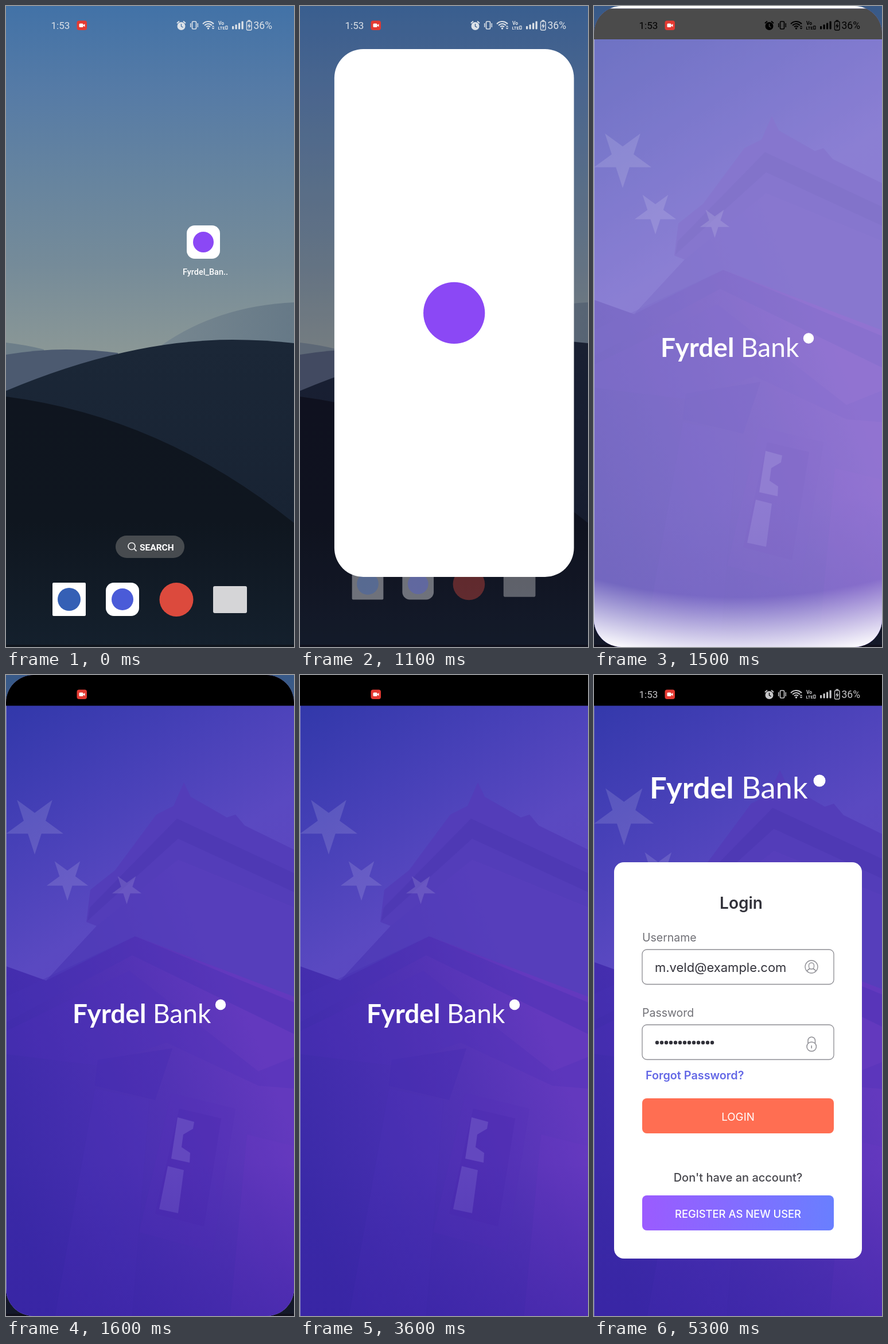
An HTML page with a canvas that plays this animation: 502 px wide and 1116 px high, repeating every 6.2 s.

```html
<!DOCTYPE html>
<html lang="en">
<head>
<meta charset="utf-8">
<title>Bank app launch</title>
<style>
  html, body { margin: 0; width: 100%; height: 100%; overflow: hidden; background: #000; }
  canvas { display: block; width: 502px; height: 1116px; }
</style>
</head>
<body>
<canvas id="stage" width="502" height="1116"></canvas>
<script>
const W = 502, H = 1116, LOOP = 6200, STEP = 100, BAR = 53.5;
const ctx = document.getElementById('stage').getContext('2d');
const clamp = v => Math.max(0, Math.min(1, v));
const lerp = (a, b, p) => a + (b - a) * p;

function gradient(x0, y0, x1, y1, ...colors) {
  const g = ctx.createLinearGradient(x0, y0, x1, y1);
  colors.forEach((c, i) => g.addColorStop(i / (colors.length - 1), c));
  return g;
}

function rect(x, y, w, h, fill) {
  ctx.fillStyle = fill;
  ctx.fillRect(x, y, w, h);
}

function box(x, y, w, h, r, fill, stroke, width = 1.3) {
  ctx.beginPath();
  ctx.roundRect(x, y, w, h, r);
  if (fill) { ctx.fillStyle = fill; ctx.fill(); }
  if (stroke) { ctx.strokeStyle = stroke; ctx.lineWidth = width; ctx.stroke(); }
}

function circle(x, y, r, fill) {
  ctx.beginPath();
  ctx.arc(x, y, r, 0, Math.PI * 2);
  ctx.fillStyle = fill;
  ctx.fill();
}

function shape(d, fill) {
  ctx.fillStyle = fill;
  ctx.fill(new Path2D(d), 'evenodd');
}

function line(d, color, width = 1.5) {
  ctx.strokeStyle = color;
  ctx.lineWidth = width;
  ctx.stroke(new Path2D(d));
}

function text(str, x, y, font, fill, align = 'left') {
  ctx.font = font + ', sans-serif';
  ctx.textAlign = align;
  ctx.fillStyle = fill;
  ctx.fillText(str, x, y);
}

function group(draw) {
  ctx.save();
  draw();
  ctx.restore();
}

// Five-pointed star with its tip downwards.
function star(x, y, r, fill) {
  ctx.beginPath();
  for (let i = 0; i < 10; i++) {
    const a = Math.PI / 2 + i * Math.PI / 5, d = i % 2 ? r * 0.382 : r;
    ctx.lineTo(x + d * Math.cos(a), y + d * Math.sin(a));
  }
  ctx.fillStyle = fill;
  ctx.fill();
}

function statusBar(ink) {
  text('1:53', 78.5, 40, '17px Roboto', ink);
  text('36%', 431.5, 40, '17.5px Roboto', ink);

  box(123.5, 25.5, 17.5, 16.5, 4, '#e33a32');
  box(127.5, 30.5, 7, 6.5, 1.5, '#fff');
  shape('M134 33.7L137.5 31V36.5Z', '#fff');

  // The clock hands are cut out of the dial.
  shape('M298.5 35A7 7 0 0 1 312.5 35A7 7 0 0 1 298.5 35ZM304.8 31H306.2V35L308.9 36.7L308.2 37.8L304.8 35.8Z', ink);
  line('M298 30L302 26.5M313 30L309 26.5', ink, 2);

  box(324.5, 27, 7, 13, 1.5, null, ink, 1.7);
  line('M321.7 30V37M334.3 30V37', ink, 1.5);

  ctx.strokeStyle = ink;
  ctx.lineWidth = 2.2;
  for (const r of [4.5, 8.5, 12.5]) {
    ctx.beginPath();
    ctx.arc(352.5, 39.5, r, -Math.PI * 0.77, -Math.PI * 0.23);
    ctx.stroke();
  }
  circle(352.5, 39, 1.7, ink);
  shape('M358.5 36.5L361 34L363.5 36.5ZM358.5 38L361 40.5L363.5 38Z', ink);

  text('Vo', 370, 33, 'bold 8.5px Roboto', ink);
  text('LTE', 369.5, 41, 'bold 7.5px Roboto', ink);
  box(382.8, 34.8, 3.2, 5.6, 0.5, null, ink, 1.2);

  for (let i = 0; i < 4; i++) box(394 + i * 5.5, 35 - i * 2.8, 3.2, 5.5 + i * 2.8, 1, ink);

  box(419.5, 27, 8.5, 15, 2, null, ink, 1.4);
  rect(421.5, 24.5, 4.5, 1.8, ink);
  shape('M424.8 29L421 35.5H423.5L422.5 40.5L426.8 33.8H424.2Z', ink);
}

function wallpaper() {
  rect(0, 0, W, H, gradient(0, 0, 0, 600, '#4272a7', '#567ba6', '#66849f', '#758b99', '#8a9796'));
  shape('M272 590Q370 522 502 516V620H272Z', gradient(272, 0, 502, 0, '#778790', '#667987'));
  shape('M0 586Q35 590 66 598V620H0Z', '#6d7e89');
  shape('M0 607Q55 598 105 598Q150 598 195 604V680H0Z', '#4c5a70');
  shape('M0 670Q212 581 395 581Q450 581 502 587V920H0Z', gradient(0, 581, 0, 900, '#1b2737', '#182333'));
  shape('M0 680Q271 715 502 900V1116H0Z', gradient(0, 680, 0, H, '#0f151f', '#0f161f', '#14202d'));
  rect(0, 1112, W, 4, '#10161e');
}

function homeIcons() {
  box(315, 382, 58, 58, 14, '#fff');
  circle(344, 411, 18, '#8b48f5');
  text('Fyrdel_Ban..', 347.5, 468, '500 14.5px Roboto', '#fff', 'center');

  box(191, 922, 120, 39, 19.5, '#474b4f');
  ctx.beginPath();
  ctx.arc(219, 940.5, 6, 0, Math.PI * 2);
  ctx.strokeStyle = '#eee';
  ctx.lineWidth = 1.7;
  ctx.stroke();
  line('M223.3 944.8L227.5 949', '#eee', 1.8);
  text('SEARCH', 233, 948, 'bold 15.5px Roboto', '#fff');

  box(81, 1004, 58, 58, 2, '#fff');
  circle(110, 1033, 20, '#3560b5');
  box(174, 1004, 58, 58, 14, '#fff');
  circle(203, 1033, 19, '#4a5bd8');
  circle(297, 1033.5, 29.5, '#dc4a3d');
  box(361, 1010, 59, 47, 3, '#d5d5d7');
}

function home(p) {
  wallpaper();
  rect(0, 0, W, H, `rgba(18,0,30,${0.22 * p})`);
  group(() => {
    const s = 1 - 0.07 * p;
    ctx.globalAlpha = 1 - 0.75 * p;
    ctx.translate(W / 2, H / 2);
    ctx.scale(s, s);
    ctx.translate(-W / 2, -H / 2);
    homeIcons();
  });
}

// Tinted picture of a corner building under an evening sky.
function backdrop() {
  rect(0, 0, W, H + 60, gradient(0, 60, 330, 560, '#3238aa', '#4640b7', '#5a49c1', '#5c45bf'));
  shape('M310 187L322 212L385 248L400 243L416 262L502 304V405L300 322L158 437L140 430L147 374L190 340L262 243L292 228Z', '#533db9');
  shape('M298 250L502 345V378L300 285L142 428L146 405Z', '#4e39b4');
  shape('M300 322L502 405V1176H0V507L70 532L158 437Z',
    gradient(0, 900, 470, 720, '#3a2aa7', '#452eaf', '#5233b5', '#6339be'));
  shape('M300 322L502 405V560L225 455L70 532L158 437Z', 'rgba(82,64,187,.7)');
  shape('M225 455L502 570V625L220 488L0 605V560Z', 'rgba(70,48,177,.4)');
  shape('M215 515L440 690L502 665V720L440 715L280 640L160 680L0 660V620Z', 'rgba(76,48,181,.3)');
  shape('M160 670L290 650L260 740L155 715Z', 'rgba(68,42,174,.3)');
  shape('M155 720L250 740L215 1176H75Z', 'rgba(75,48,182,.25)');
  shape('M288 728L400 755L360 1005L232 970Z', 'rgba(84,48,182,.3)');
  shape('M302 755L375 772L345 960L260 938Z', 'rgba(74,42,174,.35)');
  shape('M299 770L328 778L326 790L309 800L306 822L321 832L320 849L288 842Z', '#6348bf');
  shape('M282 855L310 862L300 937L267 930Z', '#6045be');
  shape('M420 800L502 820V1176H385Z', 'rgba(110,58,196,.2)');
  rect(0, 850, W, 326, gradient(0, 850, 0, 1116, 'rgba(55,32,162,0)', 'rgba(55,32,162,.45)'));
  const veil = 'rgba(255,255,255,.13)';
  star(50, 260, 52.5, veil);
  star(107, 355, 38, veil);
  star(210.5, 372, 27, veil);
}

function wordmark(x, y, size, bankX, markX, markY) {
  text('Fyrdel', x, y, `bold ${size}px Lato`, '#fff');
  text('Bank', bankX, y, `${size}px Lato`, '#fff');
  circle(markX, markY, size * 0.2, '#fff');
}

function splash() {
  backdrop();
  rect(0, 0, 1, H, '#8582c2');
  rect(0, 0, W, BAR, '#000');
  wordmark(116, 606, 46, 256, 374, 574);
}

// White haze over the first screen: an even layer plus a round edge moving down.
function haze(q) {
  rect(0, 0, W, H, `rgba(255,255,255,${1 - q})`);
  const edge = 200 + 1250 * q;
  const veil = ctx.createRadialGradient(251, 55, edge - 110, 251, 55, edge);
  veil.addColorStop(0, 'rgba(255,255,255,0)');
  veil.addColorStop(1, '#fff');
  rect(0, 66, W, H, veil);
}

// The app window grows out of its icon, then its first screen is revealed from the top.
function appWindow(t, p) {
  const w = lerp(58, W, p), h = lerp(80, H, p);
  const cx = lerp(344, W / 2, p), cy = lerp(434, H / 2, p);
  const radius = t < 1400 ? 14 + 45 * p : 48 * clamp((1900 - t) / 300);
  const q = clamp((t - 1355) / 205);
  group(() => {
    ctx.beginPath();
    ctx.roundRect(cx - w / 2, cy - h / 2, w, h, radius);
    ctx.clip();
    rect(0, 0, W, H, '#fff');
    if (t < 1400) {
      circle(cx, cy, lerp(18, 62, p), '#8b48f5');
      return;
    }
    group(() => {
      ctx.translate(0, 15.4 * (1 - q));
      splash();
    });
    if (q < 1) haze(q);
  });
}

function loading() {
  rect(0, 0, W, H, '#f6f6f6');
  ['#7c84ec', '#3238a6', '#4b55e2', '#3d4bcf'].forEach((c, i) => circle(228 + 13 * i, 583.5, 5.2, c));
  rect(0, 0, W, BAR, '#000');
}

function login() {
  group(() => {
    ctx.translate(0, -30);
    ctx.scale(1.045, 1.045);
    backdrop();
  });
  rect(0, 0, 1, H, '#6560b4');
  rect(0, 0, W, BAR, '#000');
  wordmark(97, 215, 52.5, 257, 393, 184);

  box(35, 326, 432, 690, 17, '#fff');
  const ink = '#32323a', grey = '#707076', edge = '#8c8c92';
  text('Login', 256.5, 407, '600 28px Inter', ink, 'center');

  text('Username', 84, 464, '19.5px Inter', grey);
  box(84, 478, 334, 60.5, 8, '#fff', edge);
  text('m.veld@example.com', 106, 517, '22px Inter', ink);
  box(368, 497, 22, 22, 11, null, edge);
  box(374.5, 501, 9, 11, 4.5, null, edge);
  line('M371.5 515.5Q373 512 376.5 511.5M386.5 515.5Q385 512 381.5 511.5', edge, 1.3);

  text('Password', 84, 595, '19.5px Inter', grey);
  box(84, 609, 334, 60.5, 8, '#fff', edge);
  for (let i = 0; i < 13; i++) circle(110 + 8 * i, 640, 3.2, ink);
  box(371, 639, 16.5, 16, 8, null, edge, 1.5);
  line('M373 641V636.5A6 6 0 0 1 385.5 636.5V641M379.2 645V650', edge, 1.5);

  text('Forgot Password?', 90, 704, '600 19.8px Inter', '#6468e6');
  box(84, 737, 334, 61, 8, '#ff6e52');
  text('LOGIN', 251, 776, '18.8px Inter', '#fff', 'center');
  text("Don't have an account?", 251, 882, '500 20px Inter', '#48484e', 'center');
  box(84, 906, 334, 61, 8, gradient(84, 0, 418, 0, '#9b5bff', '#697fff'));
  text('REGISTER AS NEW USER', 251, 945, '500 18.4px Inter', '#fff', 'center');
}

function draw(t) {
  ctx.clearRect(0, 0, W, H);
  if (t < 4500) {
    const p = t < 900 ? 0 : 1 - Math.pow(1 - clamp((t - 845) / 600), 3);
    home(p);
    if (t >= 900) appWindow(t, t < 1400 ? p : 1);
    statusBar(t < 1200 ? '#dde2e8' : '#000');
  } else {
    (t < 4700 ? loading : login)();
    statusBar('#c6c6c8');
  }
}

function frame(now) {
  draw(Math.floor(now % LOOP / STEP) * STEP);
  requestAnimationFrame(frame);
}
requestAnimationFrame(frame);
</script>
</body>
</html>
```
